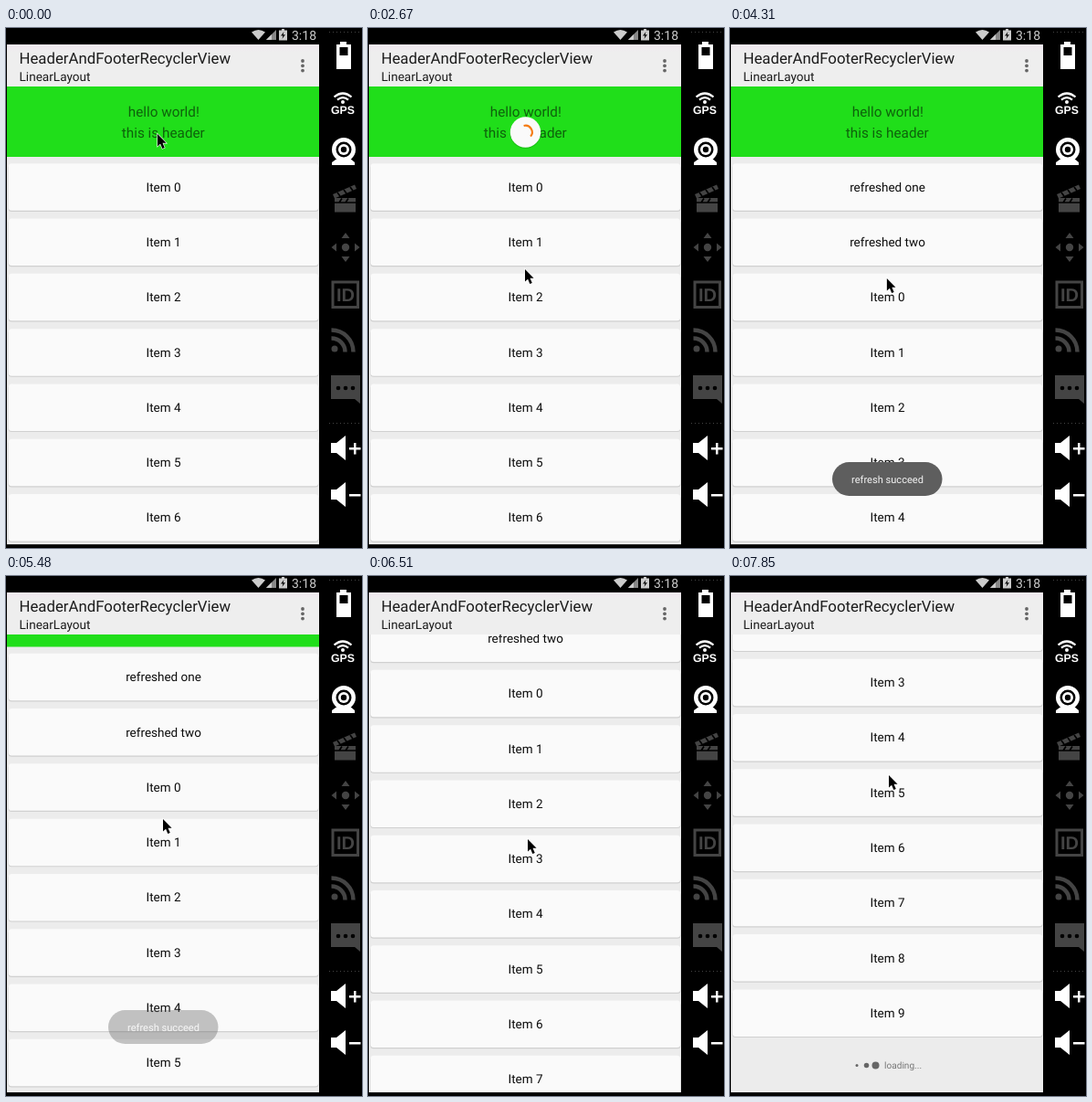
An HTML page that plays this animation: 390x569 px, repeating every 8 s.

```html
<!DOCTYPE html>
<html lang="en">
<head>
<meta charset="utf-8">
<title>RecyclerView demo</title>
<style>
  html, body { margin: 0; width: 100%; height: 100%; overflow: hidden; background: #000; }
  svg { display: block; width: 390px; height: 569px; }
  text { font-family: Roboto, sans-serif; text-rendering: geometricPrecision; }
  .mid { text-anchor: middle; }
  .item { font-size: 13.5px; fill: #0c0c0c; text-anchor: middle; }
  .dim { fill: #444; }
  .lit { fill: #fff; }
</style>
</head>
<body>
<svg viewBox="0 0 390 569">
  <defs>
    <clipPath id="view"><rect x="1" y="64" width="342" height="501"/></clipPath>
    <linearGradient id="barTint" x2="0" y2="1">
      <stop offset="0" stop-color="#f1e7f0"/><stop offset=".18" stop-color="#eee"/>
    </linearGradient>
  </defs>
  <rect width="390" height="569"/>
  <rect x="1" y="18" width="342" height="547" fill="#ececec"/>

  <g clip-path="url(#view)">
    <g id="list">
      <rect x="1" y="64" width="342" height="77" fill="#20de1a"/>
      <g class="mid" font-size="15.3" fill-opacity=".56">
        <text x="172.8" y="97">hello world!</text>
        <text x="172.3" y="120">this is header</text>
      </g>
      <g id="footer" fill="#666">
        <circle cx="139" cy="0"/><circle cx="149.5" cy="0"/><circle cx="159.5" cy="0"/>
        <text x="169" y="3.5" font-size="10.1" fill="#777">loading...</text>
      </g>
    </g>
    <g id="spinner">
      <circle cy="1" r="17" fill-opacity=".12"/>
      <circle r="16.7" fill="#fafafa"/>
      <path id="arc" fill="none" stroke="#f57c14" stroke-width="2.1"/>
    </g>
  </g>

  <!-- app bar -->
  <rect x="1" y="18" width="342" height="46" fill="url(#barTint)"/>
  <text x="14.5" y="39" font-size="16.8" fill="#1c1c1c">HeaderAndFooterRecyclerView</text>
  <text x="14.5" y="58" font-size="13.6" fill="#1c1c1c">LinearLayout</text>
  <g fill="#666"><circle cx="325" cy="36" r="1.9"/><circle cx="325" cy="41.3" r="1.9"/><circle cx="325" cy="46.6" r="1.9"/></g>

  <!-- status bar -->
  <g fill="#ccc">
    <path d="M269 4.5Q276.500-.500 284 4.500L276.500 13Z"/>
    <path d="M285 13L296 2V13Z" fill="#888"/><path d="M285 13L291 7V13Z"/>
    <path d="M299 2.500H302V1H305V2.500H308V13.500H299Z"/>
    <path d="M304.500 4L301 8.500H303.300L302.500 12L306 7.300H303.700Z" fill="#111"/>
    <text x="313" y="13" font-size="14">3:18</text>
  </g>

  <!-- emulator side panel -->
  <g stroke="#444" stroke-width="1" stroke-dasharray="1 3"><path d="M354 4.500H388M354 432.500H388"/></g>
  <path class="lit" d="M366 15H373V18H378V45H362V18H366Z"/><rect x="365.500" y="21" width="9" height="9"/>
  <g fill="none" stroke="#fff" stroke-width="2.200">
    <path d="M359.500 75.500Q369 67.500 378.500 75.500M363 78.700Q369 73.500 375 78.700"/>
  </g>
  <circle class="lit" cx="369" cy="81" r="2"/>
  <text class="lit mid" x="369" y="93.500" font-size="12.300" font-weight="700" style="font-family:'Liberation Sans',sans-serif">GPS</text>
  <path class="lit" d="M364 142H376L382 147V150H357V147Z"/>
  <circle class="lit" cx="370" cy="133" r="13"/><circle cx="370" cy="133" r="8.500"/>
  <circle class="lit" cx="370" cy="133" r="6"/><circle cx="370" cy="133" r="3.200"/>
  <g class="dim">
    <path d="M358 182L382 171.500L384 176L360 186.500Z"/>
    <rect x="360" y="186" width="23" height="15.500"/>
    <path d="M363 180L366 184M370 177L373 181M377 174L380 178M360 191H383M365 191L368 186.500M372 191L375 186.500" stroke="#000" stroke-width="1.700"/>
    <circle cx="372" cy="240" r="4.200"/>
    <path d="M372 224L376.500 230H367.500ZM372 256L376.500 250H367.500ZM356.500 240L362 235.500V244.500ZM387.500 240L382 235.500V244.500Z"/>
  </g>
  <rect x="358" y="278" width="27.500" height="27.500" fill="none" stroke="#444" stroke-width="3"/>
  <text class="dim mid" x="372" y="299" font-size="20" font-weight="700" style="font-family:'Liberation Sans',sans-serif">ID</text>
  <g fill="none" stroke="#444" stroke-width="4.500">
    <path d="M356.500 330.500A24 24 0 0 1 380.500 354.500M356.500 339.500A15 15 0 0 1 371.500 354.500"/>
  </g>
  <circle class="dim" cx="360" cy="351" r="3.500"/>
  <path class="dim" d="M356 380H388V411L382 406H356Z"/>
  <g><circle cx="364" cy="394" r="2.300"/><circle cx="372" cy="394" r="2.300"/><circle cx="380" cy="394" r="2.300"/></g>
  <g class="lit">
    <path id="speaker" d="M356 454H362L372 446V473L362 465H356Z"/>
    <use href="#speaker" y="51"/>
    <path d="M376 459H381V454H383.500V459H388.500V461.500H383.500V466.500H381V461.500H376ZM376 510H388.500V512.500H376Z"/>
  </g>

  <g id="toast">
    <rect x="112" y="475" width="120.500" height="37" rx="18.500" fill="#5e5e5e"/>
    <text class="mid" x="172.500" y="498" font-size="11.100" fill="#f4f4f4">refresh succeed</text>
  </g>
  <g id="cursor">
    <path d="M0 0V13.500L3.100 10.700L5.300 16L7.800 14.900L5.500 9.800H9.600Z" stroke="#fff" stroke-width="1.200" paint-order="stroke"/>
  </g>
</svg>
<script>
const LOOP = 8000, PITCH = 60.28, FIRST = 174;
const $ = id => document.getElementById(id);
const list = $('list'), footer = $('footer'), spinner = $('spinner'),
  arc = $('arc'), toast = $('toast'), cursor = $('cursor');
const dots = [...footer.querySelectorAll('circle')];

const labels = ['refreshed one', 'refreshed two'];
for (let i = 0; i < 10; i++) labels.push('Item ' + i);
const cards = labels.map(label => {
  const g = document.createElementNS('http://www.w3.org/2000/svg', 'g');
  g.innerHTML = `<rect x="2.500" y="-24.500" width="340" height="51.500" rx="3.500" fill="#d0d0d0"/>
    <rect x="2.800" y="-25.700" width="339.400" height="51.500" rx="3.500" fill="#fafafa"/>
    <text class="item" x="172.500" y="4.800">${label}</text>`;
  list.insertBefore(g, footer);
  return g;
});

const clamp = v => Math.max(0, Math.min(1, v));
const ramp = (t, a, b) => clamp((t - a) / (b - a));
const smooth = u => .5 - .5 * Math.cos(Math.PI * u);
const place = (el, x, y, extra = '') => el.setAttribute('transform', `translate(${x} ${y})${extra}`);

// Linear interpolation through [time, value] pairs.
function track(keys, t) {
  let i = 1;
  while (i < keys.length - 1 && t > keys[i][0]) i++;
  const [t0, a] = keys[i - 1], [t1, b] = keys[i];
  return a + (b - a) * ramp(t, t0, t1);
}

const cursorX = [[0, 166], [300, 166], [1040, 172], [4200, 172], [4900, 171], [5480, 172],
  [5924, 173], [6220, 179], [6516, 175], [7256, 173], [7848, 174]];
const cursorY = [[0, 116], [200, 116], [300, 124], [890, 248], [1188, 264], [4200, 264], [4296, 274],
  [4596, 346], [4892, 367], [5100, 367], [5188, 352], [5480, 266], [5628, 250], [5776, 250],
  [6220, 359], [6368, 340], [6664, 236], [6812, 228], [7108, 340], [7256, 373], [7404, 373],
  [7552, 340], [7848, 218]];
const scrollY = [[0, 0], [5100, 0], [5188, 6], [5480, 63.5], [5628, 93], [5776, 110.8], [6220, 110.8],
  [6368, 120], [6664, 212], [6812, 236], [6960, 238.4], [7404, 238.4], [7552, 262], [7848, 359]];
const pullY = [[0, 94], [440, 94], [1040, 119], [1188, 114]];

function drawSpinner(t) {
  const scale = 1 - ramp(t, 2740, 2930);
  spinner.style.display = t > 440 && scale > 0 ? '' : 'none';
  place(spinner, 172.5, track(pullY, t), ` scale(${scale})`);
  const turn = (t - 2668) / 1333;
  const start = -105 + 430 * turn;
  const sweep = t < 1180 ? 60 + 220 * ramp(t, 440, 1040) : 145 + 115 * Math.sin(turn * 2 * Math.PI);
  const at = deg => `${7.3 * Math.cos(deg * Math.PI / 180)} ${7.3 * Math.sin(deg * Math.PI / 180)}`;
  arc.setAttribute('d', `M${at(start)}A7.3 7.3 0 ${sweep > 180 ? 1 : 0} 1 ${at(start + sweep)}`);
  arc.setAttribute('opacity', t < 1180 ? .3 + .7 * ramp(t, 440, 1040) : 1);
}

function draw(time) {
  // The screen was refreshed in steps of 148 ms.
  const t = time < 290 ? 0 : 300 + 148 * Math.floor((time - 290) / 148);

  place(list, 0, -track(scrollY, t));
  const shift = 2 * smooth(ramp(t, 2760, 3030)), fade = ramp(t, 3030, 3200);
  cards.forEach((card, i) => {
    place(card, 0, FIRST + PITCH * (i < 2 ? i : i - 2 + shift));
    if (i < 2) card.setAttribute('opacity', fade);
  });

  place(footer, 0, FIRST + PITCH * (10 + shift) - 2.8);
  dots.forEach((dot, i) =>
    dot.setAttribute('r', 2.75 - 1.25 * Math.cos((t - 7848) / 150 + i * Math.PI / 2)));

  drawSpinner(t);
  toast.setAttribute('opacity', ramp(t, 2860, 3500) * (1 - ramp(t, 5250, 5610)));
  place(cursor, track(cursorX, t), track(cursorY, t));
}

function tick() {
  draw(performance.now() % LOOP);
  requestAnimationFrame(tick);
}
tick();
</script>
</body>
</html>
```
